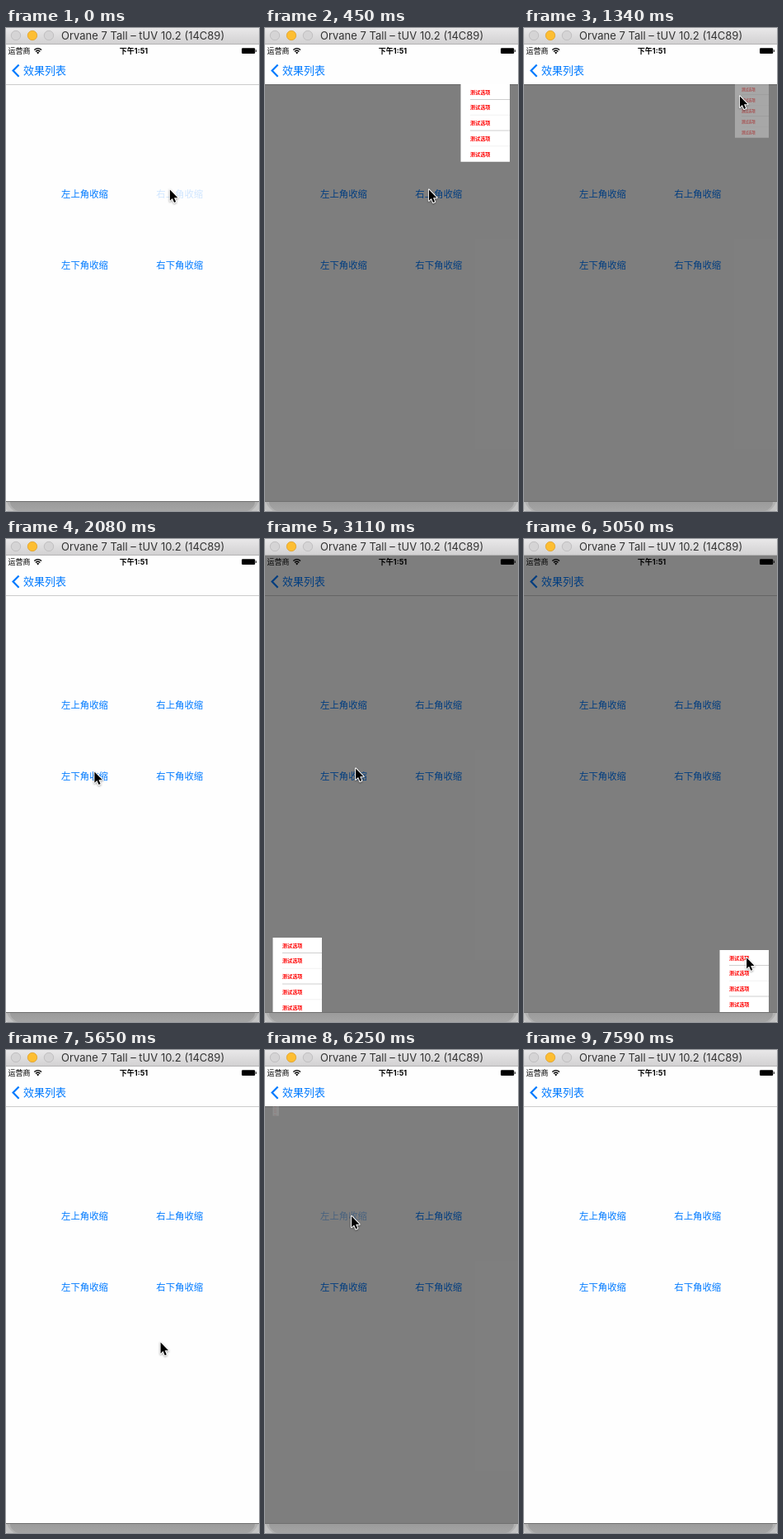
An HTML page that plays this animation: 307 px wide and 584 px high, repeating every 7.74 s.

```html
<!DOCTYPE html>
<html lang="zh-CN">
<head>
<meta charset="utf-8">
<title>Corner menus</title>
<style>
html, body { margin: 0; width: 100%; height: 100%; overflow: hidden; background: #fff; }
svg { display: block; position: absolute; left: 0; top: 0; }
text { font-family: "Noto Sans CJK SC", "Noto Sans CJK", "Noto Sans", sans-serif; white-space: pre; }
.title { font: 13px Inter, sans-serif; fill: #333; }
.status { font-size: 9px; }
.clock { font: bold 9px Inter, "Noto Sans CJK SC", sans-serif; }
.back { font-size: 13px; fill: #007aff; }
.label { font-size: 11.4px; fill: #007aff; }
.item { font-size: 6.1px; font-weight: 700; fill: #f00; }
#cursor { filter: drop-shadow(0 1px .8px rgba(0, 0, 0, .35)); }
</style>
</head>
<body>
<svg width="307" height="584" viewBox="0 0 307 584">
  <defs>
    <linearGradient id="bar" x2="0" y2="1">
      <stop stop-color="#e9e8e9"/><stop offset="1" stop-color="#d1d0d1"/>
    </linearGradient>
    <linearGradient id="shade" x2="0" y2="1">
      <stop stop-color="#8f8f8f"/><stop offset="1" stop-color="#a6a6a6"/>
    </linearGradient>
  </defs>

  <!-- window and its shadow -->
  <rect width="307" height="584" fill="#d6d6d6"/>
  <rect x="-6" y="520" width="319" height="70" rx="24" fill="#c3c3c3"/>
  <rect x="-1" y="520" width="309" height="68" rx="24" fill="#b1b1b1"/>
  <rect x="5" y="560" width="297" height="26" rx="20" fill="url(#shade)"/>
  <rect y="20" width="307" height="552" fill="#fefefe"/>
  <rect y="572" width="307" height="1" fill="#707070"/>

  <!-- title bar -->
  <rect width="307" height="20" fill="url(#bar)"/>
  <rect y="19" width="307" height="1" fill="#b5b4b5"/>
  <g stroke-width=".8">
    <circle cx="12" cy="9" r="5.7" fill="#d5d4d5" stroke="#bab9ba"/>
    <circle cx="32" cy="9" r="5.7" fill="#fdbe32" stroke="#dfa02a"/>
    <circle cx="52" cy="9" r="5.7" fill="#d5d4d5" stroke="#bab9ba"/>
  </g>
  <text class="title" x="67" y="14">Orvane 7 Tall – tUV 10.2 (14C89)</text>

  <!-- status bar -->
  <text class="status" x="2.5" y="31.3">运营商</text>
  <g fill="none" stroke="#000" stroke-width="1.3">
    <path d="M34.3 26.6Q38.7 22.6 43.1 26.6M36 28.5Q38.7 26 41.4 28.5"/>
  </g>
  <path d="M37 29.6Q38.7 28.2 40.4 29.6L38.7 31.4Z"/>
  <text class="clock" x="155" y="31.2" text-anchor="middle">下午1:51</text>
  <rect x="286" y="24.2" width="16.2" height="6.8" rx="1.2"/>
  <rect x="302.8" y="26.3" width="1" height="2.7" rx=".5"/>

  <!-- navigation bar -->
  <path d="M15.6 44.5L8.6 51.6L15.6 58.7" fill="none" stroke="#007aff" stroke-width="2.2"/>
  <text class="back" x="21" y="56">效果列表</text>
  <rect y="68" width="307" height="1" fill="#cbcbcb"/>

  <g id="labels"></g>
  <rect id="dim" width="307" fill-opacity=".5"/>
  <g id="menus"></g>
  <path id="cursor" d="M.4 .4V13.8L3.4 10.9L5.6 16L7.6 15.1L5.5 10.2H9.9Z" stroke="#fff" stroke-width="2" paint-order="stroke" stroke-linejoin="round"/>
</svg>
<script>
const LOOP = 7740, ROW = 18.75, WIDTH = 59.5;
const $ = id => document.getElementById(id);

// press and close are counted in steps of the held clock
const menus = [
  { text: '右上角收缩', lx: 182.3, ly: 204.7, x: 297, y: 68, h: 93.75, press: 0, close: 9 },
  { text: '左下角收缩', lx: 67, ly: 290.8, x: 9.5, y: 572, h: 90, press: 15, close: 24 },
  { text: '右下角收缩', lx: 182.3, ly: 290.8, x: 297, y: 572, h: 75, press: 29, close: 36 },
  { text: '左上角收缩', lx: 67, ly: 204.7, x: 9.5, y: 68, h: 93.75, press: 41, close: 47 }
];

// cursor stops: step, x, y
const path = [
  [0, 198.5, 195], [3, 198.5, 195], [8, 261.5, 82], [10, 261.5, 82],
  [14, 107, 281], [17, 107, 281], [21, 109.7, 277], [24, 109.7, 277],
  [28, 220.7, 287.5], [31, 220.7, 287.5], [34, 269.7, 505.8], [36, 269.7, 505.8],
  [40, 104.7, 200.5], [43, 104.7, 200.5], [45, 141, 286], [47, 141, 286],
  [50, 150, 576], [51, 150, 600]
];

function add(parent, tag, attrs, text = '') {
  const el = document.createElementNS('http://www.w3.org/2000/svg', tag);
  for (const k in attrs) el.setAttribute(k, attrs[k]);
  el.textContent = text;
  return parent.appendChild(el);
}

for (const m of menus) {
  m.label = add($('labels'), 'text', { class: 'label', x: m.lx, y: m.ly }, m.text);
  m.box = add($('menus'), 'g', {});
  const left = m.x > 150 ? -WIDTH : 0, top = m.y > 300 ? -m.h : 0;
  add(m.box, 'rect', { x: left, y: top, width: WIDTH, height: m.h, fill: '#fff' });
  for (let i = 0; i * ROW < m.h; i++) {
    const y = top + i * ROW;
    add(m.box, 'text', { class: 'item', x: left + 11.5, y: y + 11.7 }, '测试选项');
    if (i) add(m.box, 'rect', {
      x: left + 11.5, y: y - .7, width: WIDTH - 11.5, height: .9,
      fill: i % 2 ? '#cacaca' : '#f1f1f1'
    });
  }
}

const ease = p => p * p * (3 - 2 * p);

function cursorAt(s) {
  const i = Math.max(1, path.findIndex(p => p[0] >= s));
  const [a, ax, ay] = path[i - 1], [b, bx, by] = path[i];
  const p = ease((s - a) / (b - a));
  return [ax + (bx - ax) * p, ay + (by - ay) * p];
}

// the picture is held for about 150 ms at a time
const stepAt = t => Math.min(51, Math.floor(t < 3550 ? t / 148 : 24 + (t - 3550) / 149.4));

function draw(s) {
  let dimTop = 572;
  for (const m of menus) {
    const since = s - m.press, open = since > 0 && s <= m.close;
    m.label.setAttribute('opacity', since === 0 ? .18 : since === 1 ? .42 : 1);
    m.box.setAttribute('display', open ? 'inline' : 'none');
    if (!open) continue;
    dimTop = m.y > 300 ? 20 : 68;
    const grow = ease(Math.min(1, since * .5 - .28));
    const closing = s === m.close;
    m.box.setAttribute('transform', `translate(${m.x} ${m.y}) scale(${closing ? .69 : grow})`);
    m.box.setAttribute('opacity', closing ? .32 : grow);
  }
  $('dim').setAttribute('y', dimTop);
  $('dim').setAttribute('height', 572 - dimTop);
  $('cursor').setAttribute('transform', `translate(${cursorAt(s)})`);
}

const start = performance.now();
function tick() {
  draw(stepAt((performance.now() - start) % LOOP));
  requestAnimationFrame(tick);
}
tick();
</script>
</body>
</html>
```
